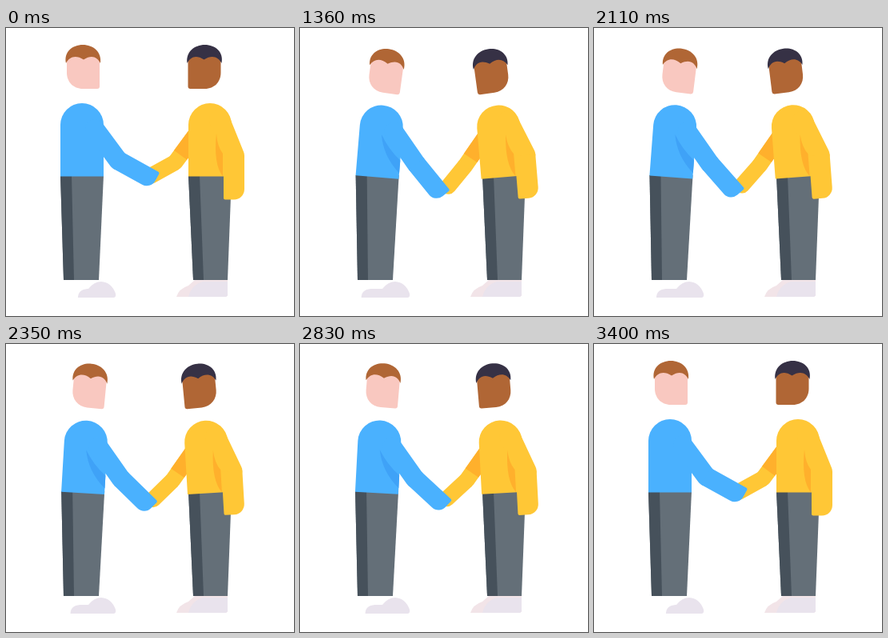
Write an HTML page with a canvas that moves like this. It is 360x360 px and loops after 3.43 s.

```html
<!DOCTYPE html>
<html lang="en">
<head>
<meta charset="utf-8">
<title>Handshake</title>
<style>
  html, body { margin: 0; width: 100%; height: 100%; overflow: hidden; background: #fff; }
  canvas { display: block; width: 360px; height: 360px; }
</style>
</head>
<body>
<canvas id="stage" width="360" height="360"></canvas>
<script>
const ctx = document.getElementById('stage').getContext('2d');
const LOOP = 3430, START = 1000, SHAKE = 800, STEP = 30;
const DEG = Math.PI / 180;

const BLUE = '#4ab1fe', BLUE_SHADE = '#3fa2f7';
const YELLOW = '#ffc736', YELLOW_SHADE = '#ffb02c';
const TROUSERS = '#646f78', TROUSERS_SHADE = '#46515b';
const SHOE = '#e9e3ed', HEEL = '#f2e4e8';
const PALE = '#f9c8c0', BROWN = '#b06635', DARK = '#363145';

const mix = (a, b, k) => a + (b - a) * k;

function fill(d, color) {
  ctx.fillStyle = color;
  ctx.fill(new Path2D(d));
}

function saved(draw) {
  ctx.save();
  draw();
  ctx.restore();
}

function mirrored(width, draw) {
  saved(() => {
    ctx.translate(width, 0);
    ctx.scale(-1, 1);
    draw();
  });
}

// Tilts around a pivot while moving it by dx, dy.
function tilted(x, y, dx, dy, degrees, squash, draw) {
  saved(() => {
    ctx.translate(x + dx, y + dy);
    ctx.rotate(degrees * DEG);
    ctx.scale(1, 1 - squash);
    ctx.translate(-x, -y);
    draw();
  });
}

const leaning = (k, draw) => tilted(95, 186, 1.3 * k, k, 4.3 * k, 0.012 * k, draw);

// Upper arm and forearm hang from the shoulder as a two-joint chain.
function arm(x, y, { upper, upperLength, fore, foreLength, width, color, sleeve }) {
  const bone = (length, paint) => {
    ctx.strokeStyle = paint;
    ctx.beginPath();
    ctx.moveTo(0, 0);
    ctx.lineTo(length, 0);
    ctx.stroke();
  };
  saved(() => {
    ctx.lineWidth = width;
    ctx.translate(x, y);
    ctx.rotate(upper * DEG);
    ctx.lineCap = 'round';
    bone(upperLength, color);
    ctx.lineCap = 'butt';
    if (sleeve) bone(upperLength * 0.77, sleeve);
    ctx.translate(upperLength, 0);
    ctx.rotate((fore - upper) * DEG);
    ctx.fillStyle = color;
    ctx.beginPath();
    ctx.roundRect(0, -width / 2, foreLength, width, [0, 2, width / 2, 0]);
    ctx.fill();
  });
}

const reach = k => ({ upper: 53.6 - 2.4 * k, upperLength: 49, fore: 29 + 15.7 * k });

function head(k, shift, skin, hair) {
  tilted(96, 48, shift * k, 4.5 * k, 7 * k, 0, () => {
    fill('M76 56V38Q96 24 117 38V73Q117 76 114 76H96C84 76 76 67 76 56Z', skin);
    fill('M75 44C72 30 83 21 96 21S120 30 118 44' +
         'C114 36 107 33 97 39.5C87 33 79 36 75 44Z', hair);
  });
}

function torso(color) {
  fill('M68 185.5V121A27 27 0 0 1 122 121V185.5Z', color);
}

function legs(topLeft, topRight, footLeft, footRight) {
  const panel = (a, b, c, d, color) => fill(`M${a} 184H${b}L${c} 315H${d}Z`, color);
  panel(topLeft, topRight, footRight, footLeft, TROUSERS);
  panel(topLeft, topLeft + 14, footLeft + 13, footLeft, TROUSERS_SHADE);
}

function leftPerson(k) {
  const heel = mix(90, 78, k);
  fill(`M${heel} 337Q${heel} 327 ${heel + 12} 326H103Q110 317 119 317` +
       'Q132 318 137 332Q138 337 134 337Z', SHOE);
  legs(68 + 1.5 * k, 122 + 1.5 * k, 72, 116);
  leaning(k, () => {
    torso(BLUE);
    ctx.globalAlpha = Math.min(1, 1.5 * k);
    fill('M96 131Q106 149 122 162V178Q100 158 96 131Z', BLUE_SHADE);
    ctx.globalAlpha = 1;
    arm(111, 126, { ...reach(k), foreLength: 53, width: 24, color: BLUE });
  });
  head(k, 10.3, PALE, BROWN);
}

function rightPerson(k) {
  fill('M213 336Q216 326 228 322L236 315H277V332Q278 336 273 336Z', HEEL);
  fill('M228 336Q232 321 246 317H277V332Q278 336 273 336Z', SHOE);
  legs(228, 282, 234, 277);
  mirrored(350, () => leaning(k, () => {
    arm(109.5, 128.5, { ...reach(k), foreLength: 44, width: 20, color: YELLOW, sleeve: YELLOW_SHADE });
    torso(YELLOW);
    arm(83, 115, { upper: 112, upperLength: 48, fore: 90, foreLength: 55, width: 26, color: YELLOW });
    fill('M87 132Q86 148 79 157V185.5Q91 170 87 132Z', YELLOW_SHADE);
  }));
  mirrored(344.5, () => head(k, 8.3, BROWN, DARK));
}

function bend(time) {
  if (time < START + STEP) return 0;
  const t = Math.floor((time - START) / STEP) * STEP;
  return (1 - Math.cos(2 * Math.PI * t / SHAKE)) / 2 / 0.88;
}

function frame() {
  const k = bend(performance.now() % LOOP);
  ctx.fillStyle = '#fff';
  ctx.fillRect(0, 0, 360, 360);
  rightPerson(k);
  leftPerson(k);
  requestAnimationFrame(frame);
}
frame();
</script>
</body>
</html>
```
